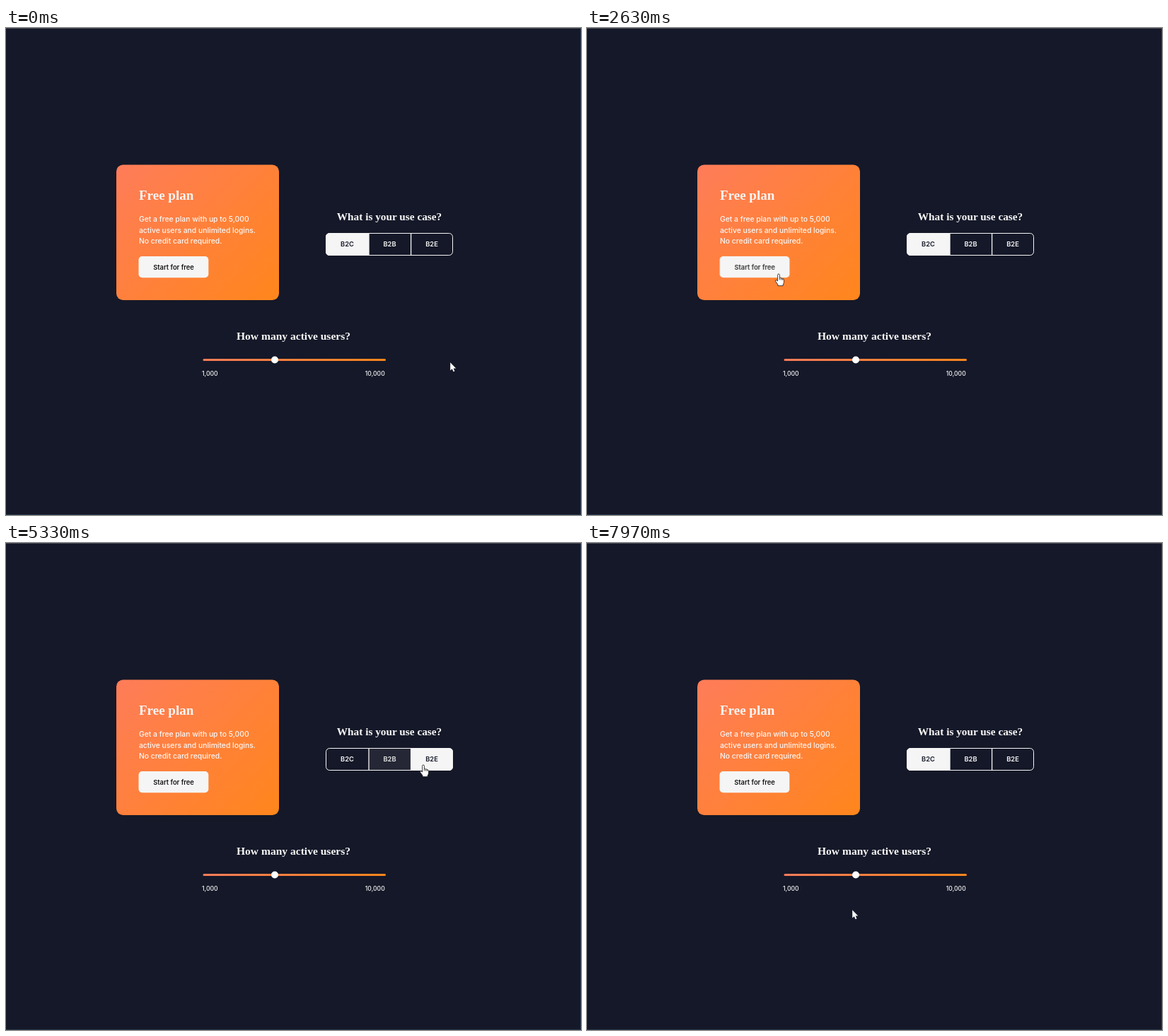
Write an HTML page that moves like this. It is 813x689 px and loops after 8000 ms.

```html
<!DOCTYPE html>
<html lang="en">
<head>
<meta charset="utf-8">
<title>Pricing options</title>
<style>
html, body { margin: 0; width: 100%; height: 100%; overflow: hidden; background: #151828; }
svg { display: block; width: 100vw; height: 100vh; }
text { fill: #f7f7f7; font-family: Inter, sans-serif; }
.title { font-family: "Liberation Serif", serif; font-weight: 700; }
.body { font-size: 10.35px; font-weight: 500; }
.strong { font-size: 9.35px; font-weight: 600; text-anchor: middle; }
.range { font-size: 8.6px; font-weight: 500; }

.btn, .label, .seg, .pointer, .arrow, .hand { animation: 8s linear infinite; }
.btn { animation-name: lift; }
.label { animation-name: dim; fill: #151515; }
.seg { fill: #151828; color: #f7f7f7; }
.seg text { fill: currentColor; }
.b2c { animation-name: b2c; }
.b2b { animation-name: b2b; }
.b2e { animation-name: b2e; }
.pointer { animation-name: move; }
.arrow { animation-name: arrow; animation-timing-function: step-end; }
.hand { animation-name: hand; animation-timing-function: step-end; }

@keyframes lift {
  0%, 17.9%, 28.6%, 32.4%, 42.5%, 100% { transform: none; filter: drop-shadow(0 0 0 #0000); }
  20.2%, 26.2%, 35%, 40% { transform: translate(.7px, -.6px); filter: drop-shadow(0 1.5px 1.5px #0006); }
}
@keyframes dim {
  0%, 17.9%, 20.2%, 26.2%, 28.6%, 31.9%, 35%, 40%, 42.5%, 100% { opacity: 1; }
  19%, 27.4%, 32.875%, 41.2% { opacity: .86; }
}
@keyframes b2c {
  0%, 55.8%, 77.8%, 100% { fill: #f5f5f5; color: #151828; }
  57%, 76.5% { fill: #151828; color: #f7f7f7; }
}
@keyframes b2b {
  0%, 49.9%, 66.7%, 72%, 82.4%, 100% { fill: #151828; color: #f7f7f7; }
  51.4%, 65.8%, 73.2%, 81.2% { fill: #f5f5f5; color: #151828; }
}
@keyframes b2e {
  0%, 60.6%, 75.4%, 100% { fill: #151828; color: #f7f7f7; }
  61.8%, 74.2% { fill: #f5f5f5; color: #151828; }
}
@keyframes move {
  0%, 7.125% { transform: translate(628px, 473px); animation-timing-function: cubic-bezier(.45, .05, .7, .85); }
  17.125% { transform: translate(297px, 348px); animation-timing-function: ease-out; }
  20.875%, 24.625% { transform: translate(262px, 345px); animation-timing-function: ease-in-out; }
  28.75%, 31.25% { transform: translate(285px, 360px); animation-timing-function: ease-in; }
  32.875% { transform: translate(271px, 348px); animation-timing-function: ease-out; }
  35%, 38.75% { transform: translate(262px, 344px); animation-timing-function: ease-in-out; }
  48.75%, 49.125% { transform: translate(520px, 325px); animation-timing-function: ease-out; }
  53.75%, 55.875% { transform: translate(526px, 312px); animation-timing-function: ease-in; }
  59.625% { transform: translate(560px, 320px); animation-timing-function: ease-out; }
  63.375%, 66.625% { transform: translate(590px, 314px); animation-timing-function: ease-in; }
  70% { transform: translate(560px, 321px); animation-timing-function: ease-out; }
  73.75% { transform: translate(527px, 311px); }
  75.875%, 76.25% { transform: translate(526px, 309px); animation-timing-function: ease-in-out; }
  77.875%, 81.25% { transform: translate(498px, 309px); animation-timing-function: cubic-bezier(.42, 0, .75, .8); }
  91.25% { transform: translate(565px, 496px); }
  93.75% { transform: translate(540px, 532px); }
  96% { transform: translate(480px, 547px); animation-timing-function: ease-out; }
  99.625%, 100% { transform: translate(375px, 519px); }
}
@keyframes arrow {
  0%, 27.2%, 40.6%, 83.6% { opacity: 1; }
  17.9%, 32%, 49.8% { opacity: 0; }
}
@keyframes hand {
  0%, 27.2%, 40.6%, 83.6% { opacity: 0; }
  17.9%, 32%, 49.8% { opacity: 1; }
}
</style>
</head>
<body>
<svg viewBox="0 0 813 689">
  <defs>
    <linearGradient id="card" gradientUnits="userSpaceOnUse" x1="166" y1="184" x2="376" y2="395">
      <stop stop-color="#ff7c59"/><stop offset="1" stop-color="#ff861c"/>
    </linearGradient>
    <linearGradient id="track">
      <stop stop-color="#ff7c59"/><stop offset="1" stop-color="#ff861c"/>
    </linearGradient>
    <clipPath id="group"><rect x="452" y="290" width="180" height="32" rx="5.5"/></clipPath>
  </defs>

  <rect width="813" height="689" fill="#151828"/>
  <path d="M0 .5H813" stroke="#484a52"/>
  <path d="M812.5 1V689M0 688.5H813" stroke="#26384a" fill="none"/>

  <rect x="156" y="193.5" width="230" height="191.5" rx="9.5" fill="url(#card)"/>
  <text class="title" x="188" y="243" font-size="19">Free plan</text>
  <g class="body">
    <text x="188" y="274.3">Get a free plan with up to 5,000</text>
    <text x="188" y="289.8">active users and unlimited logins.</text>
    <text x="188" y="305.3">No credit card required.</text>
  </g>
  <g class="btn">
    <rect x="187.5" y="323" width="98.8" height="30.3" rx="5" fill="#f5f5f5"/>
    <text class="strong label" x="237" y="342">Start for free</text>
  </g>

  <text class="title" x="542" y="271.5" font-size="15.3" text-anchor="middle">What is your use case?</text>
  <g clip-path="url(#group)">
    <g class="seg b2c"><rect x="452" y="290" width="61" height="32"/><text class="strong" x="482.5" y="309.4">B2C</text></g>
    <g class="seg b2b"><rect x="513" y="290" width="59.5" height="32"/><text class="strong" x="542.5" y="309.4">B2B</text></g>
    <g class="seg b2e"><rect x="572.5" y="290" width="60" height="32"/><text class="strong" x="602" y="309.4">B2E</text></g>
  </g>
  <g fill="none" stroke="#f5f5f5">
    <rect x="452.5" y="290.5" width="179" height="31" rx="5"/>
    <path d="M513 291V321M572.6 291V321" stroke-width="1.3"/>
  </g>

  <text class="title" x="406.5" y="441" font-size="15.55" text-anchor="middle">How many active users?</text>
  <rect x="278.5" y="468" width="258.5" height="3" rx="1.5" fill="url(#track)"/>
  <circle cx="380" cy="469.5" r="5" fill="#fff"/>
  <text class="range" x="277" y="492.2">1,000</text>
  <text class="range" x="535.7" y="492.2" text-anchor="end">10,000</text>

  <g class="pointer" fill="#fff" stroke="#111" stroke-linejoin="round">
    <path class="arrow" stroke="none" d="M.2 .3V11.6L2.8 9.2L4.6 13.2L6.4 12.4L4.7 8.6H8.2Z"/>
    <g class="hand" stroke-width=".8">
      <path d="M-1.4 1.4A1.4 1.4 0 0 1 1.4 1.4V5.5Q2.8 4.7 3.6 6Q5 5.4 5.6 6.8Q7.5 6.6 7.5 8.6V11.5Q7.3 13.5 6.2 15V16.7H-1V15L-4.4 10.3Q-4.8 8.4 -3 8.6L-1.4 10Z"/>
      <path fill="none" d="M1.4 5.5V8.4M3.6 6V8.6M5.6 6.8V8.8"/>
    </g>
  </g>
</svg>
</body>
</html>
```
